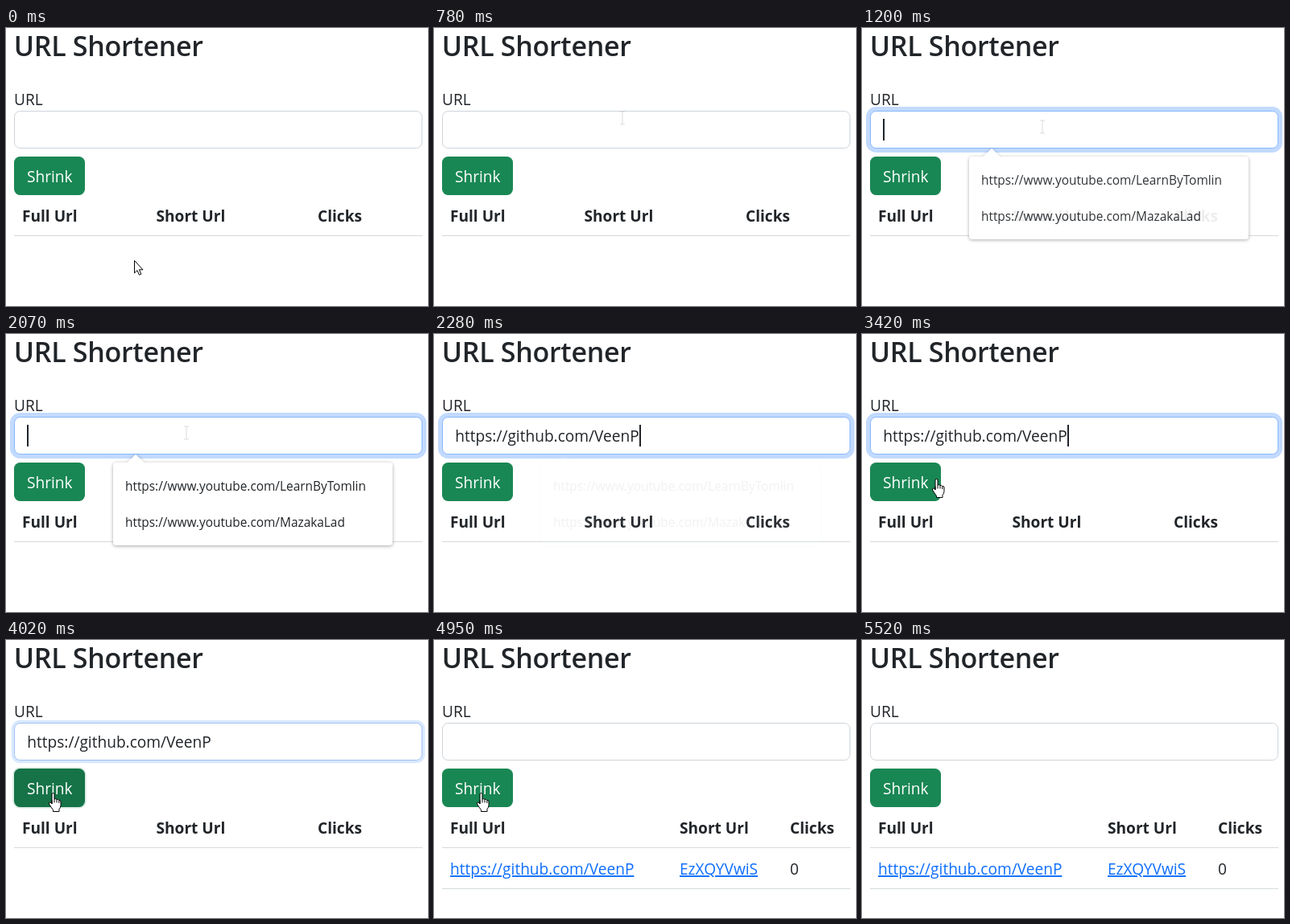
Recreate the animation shown at these times as an HTML page. Size 524 by 346 pixels, loop 6.45 s.

```html
<!DOCTYPE html>
<html lang="en">
<head>
<meta charset="utf-8">
<title>URL Shortener</title>
<style>
  html, body { margin: 0; width: 100%; height: 100%; overflow: hidden; background: #fff; }
  svg { display: block; width: 524px; height: 346px; }
  text { font: 19.1px "Open Sans", "Noto Sans", sans-serif; fill: #212529; white-space: pre; }
  .title { font-size: 34px; font-weight: 600; letter-spacing: -.3px; }
  .head { font-weight: 700; }
  .link { fill: #0d6efd; text-decoration: underline; }
  .hint { font-size: 15.4px; }
  .label { fill: #fff; }
  .rule { stroke: #d4dade; }
  #menu path { fill: #fff; filter: drop-shadow(0 1px 2px rgba(0, 0, 0, .35)); }
  #arrow, #hand { fill: #fff; stroke: #000; stroke-linejoin: round; }
  #beam { fill: none; stroke: rgba(140, 130, 140, .3); }
</style>
</head>
<body>
<svg viewBox="0 0 524 346">
  <text class="title" x="9.8" y="35">URL Shortener</text>
  <text x="10" y="96">URL</text>

  <rect id="fieldRing"/>
  <rect id="field" x="10.5" y="103.5" width="506" height="46" rx="7" fill="#fff"/>
  <text id="typed" x="26.3" y="134">https://github.com/VeenP</text>
  <rect id="caret" y="113" width="2" height="27" fill="#212529"/>

  <rect id="buttonRing"/>
  <rect id="button" x="10" y="160" width="88" height="48" rx="7.5"/>
  <text class="label" x="26" y="192">Shrink</text>

  <text class="head" x="20" y="241">Full Url</text>
  <text class="head" id="shortHead" y="241">Short Url</text>
  <text class="head" id="clickHead" y="241">Clicks</text>
  <path class="rule" d="M10 258.5H517"/>
  <g id="row">
    <text class="link" x="20" y="292">https://github.com/VeenP</text>
    <text class="link" x="305" y="292">EzXQYVwiS</text>
    <text x="442" y="292">0</text>
    <path class="rule" d="M10 309.5H517"/>
  </g>

  <g id="menu">
    <path d="M133 164q0-4 4-4H150L161 150L172 160H476q4 0 4 4V259q0 4-4 4H137q-4 0-4-4Z"/>
    <text class="hint" x="148" y="195">https://www.youtube.com/LearnByTomlin</text>
    <text class="hint" x="148" y="240">https://www.youtube.com/MazakaLad</text>
  </g>

  <g id="pointer">
    <path id="arrow" d="M-.5.5V16L3 12.7L5.4 18.3L7.8 17.3L5.4 11.8H10Z"/>
    <path id="beam" d="M-3-8H-1L0-7L1-8H3M0-7V7M-3 8H-1L0 7L1 8H3"/>
    <g id="hand" transform="translate(-5 .5)">
      <path d="M4 1.5Q4 0 5.5 0Q7 0 7 1.5V7.5Q9 6.5 10 8Q11.8 7.2 12.8 9Q15 8.4 15 10.5V15Q15 18 13 20V23H5.5V21Q4 19 1 14.5Q-.5 12 1.2 11.5Q2.5 11.3 4 13.5Z"/>
      <path fill="none" d="M4 13.5V9M7 7.5V12M10 8.5V12M12.8 9.5V12.5"/>
    </g>
  </g>
</svg>
<script>
const LOOP = 6450, STEP = 30;
const $ = id => document.getElementById(id);
const set = (id, attrs) => {
  for (const k in attrs) $(id).setAttribute(k, attrs[k]);
};
const show = (id, on) => set(id, { visibility: on ? "inherit" : "hidden" });
const within = (t, a, b) => t >= a && t < b;

// Smooth 0..1 ramp starting at a
const ramp = (t, a, len = 150) => {
  const p = Math.min(1, Math.max(0, (t - a) / len));
  return p * p * (3 - 2 * p);
};
const mix = (a, b, p) =>
  `rgb(${a.map((v, i) => Math.round(v + (b[i] - v) * p)).join()})`;

// time, x, y of the pointer
const path = [
  [90, 160, 289], [240, 168, 262], [450, 198, 190], [630, 227, 126],
  [750, 234, 112], [780, 234, 112], [960, 224, 123], [2790, 224, 123],
  [3000, 190, 139], [3210, 143, 162], [3390, 100, 177], [3420, 92, 180],
  [3540, 58, 190], [4950, 58, 190], [5010, 59, 192], [5130, 64, 208],
  [5310, 92, 265], [5520, 122, 348]
];

function pointerAt(t) {
  const n = path.findIndex(p => p[0] > t);
  if (n < 0) return path[path.length - 1].slice(1);
  if (n === 0) return path[0].slice(1);
  const [t0, x0, y0] = path[n - 1], [t1, x1, y1] = path[n];
  const p = (t - t0) / (t1 - t0);
  return [Math.round(x0 + (x1 - x0) * p), Math.round(y0 + (y1 - y0) * p)];
}

function ring(id, x, y, w, h, rgb, alpha, p) {
  const s = 5 * p;
  set(id, {
    x: x - s, y: y - s, width: w + 2 * s, height: h + 2 * s, rx: 7.5 + s,
    fill: `rgba(${rgb},${alpha * p})`
  });
}

function drawPointer(t) {
  const [x, y] = pointerAt(t);
  const onField = y >= 103 && y < 150;
  const onButton = x >= 10 && x < 98 && y >= 160 && y < 208;
  const onLink = t > 4320 && x >= 20 && x < 248 && y >= 274 && y < 298;
  const hand = onButton || onLink;
  set("pointer", { transform: `translate(${x} ${y})` });
  show("pointer", t < 5520 && !within(t, 2130, 2850));
  show("beam", onField);
  show("hand", hand);
  show("arrow", !onField && !hand);
}

function draw(t) {
  const done = t >= 4320;
  const focus = ramp(t, 1050) - ramp(t, 3960);
  const press = done ? 0 : ramp(t, 3960);
  const hover = done ? ramp(t, 4980) - ramp(t, 5130) : ramp(t, 3420);

  ring("fieldRing", 10, 103, 507, 47, "13,110,253", .25, focus);
  ring("buttonRing", 10, 160, 88, 48, "60,153,110", .5, press);
  set("field", { stroke: mix([206, 212, 218], [134, 183, 254], focus) });
  set("button", { fill: mix([25, 135, 84], [21, 115, 71], hover) });

  show("typed", within(t, 2130, 4320));
  set("caret", { x: t < 2130 ? 26 : 255 });
  show("caret", within(t, 1050, 1590) || within(t, 2070, 2640) || within(t, 3150, 3570));
  set("menu", { opacity: ramp(t, 1050, 180) - ramp(t, 2100, 210) });

  show("row", done);
  set("shortHead", { x: done ? 305 : 186.5 });
  set("clickHead", { x: done ? 442 : 387 });
  drawPointer(t);
}

const start = performance.now();
function tick(now) {
  const t = Math.max(0, now - start) % LOOP;
  draw(Math.floor(t / STEP) * STEP);
  requestAnimationFrame(tick);
}
draw(0);
requestAnimationFrame(tick);
</script>
</body>
</html>
```
